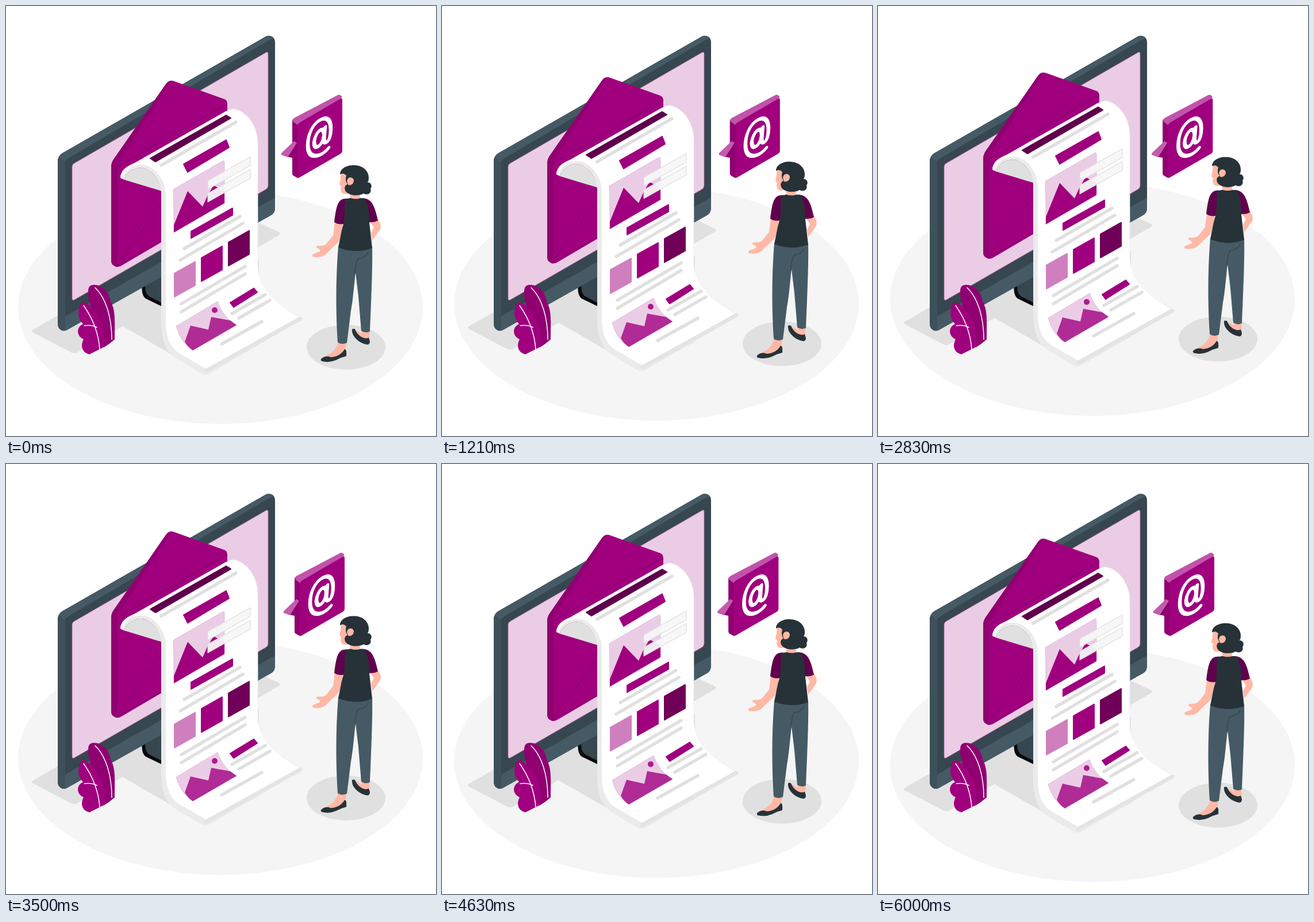
Write an HTML page that moves like this. It is 748x748 px and loops after 6040 ms.

```html
<!DOCTYPE html>
<html lang="en">
<head>
<meta charset="utf-8">
<title>Newsletter</title>
<style>
  html, body { margin: 0; width: 100%; height: 100%; overflow: hidden; background: #fff; }
  svg { display: block; width: 100vw; height: 100vh; }
  .plum { fill: #a0007e; } .plum-side { fill: #900071; } .plum-dark { fill: #60004c; }
  .wine { fill: #700058; } .blush { fill: #ebcce5; } .orchid { fill: #cf7fbe; }
  .slate { fill: #37474f; } .steel { fill: #455a64; } .ink { fill: #263238; }
  .skin { fill: #ffb8a6; } .shade { fill: #e0e0e0; }
  .line { fill: none; stroke-linecap: round; stroke-linejoin: round; }
</style>
</head>
<body>
<svg viewBox="0 0 748 748" xmlns="http://www.w3.org/2000/svg">
  <!-- floor and cast shadows -->
  <g class="float">
    <ellipse cx="373" cy="524" rx="352" ry="203" fill="#f5f5f5"/>
    <g class="shade">
      <path d="M47 563L120 521L400 360L438 376L474 393Q479 396 474 399L125 602Q120 606 114 603L47 568Q43 565 47 563Z"/>
      <path d="M196 553L345 639L440 590L440 440L270 500Z"/>
      <ellipse cx="591.5" cy="593.5" rx="68.5" ry="39"/>
    </g>
  </g>

  <!-- monitor -->
  <g>
    <path fill="#0b0b0d" d="M236 488L262 470L274 490V524L243 509Q238 505 237 498Z"/>
    <path class="slate" d="M242 487L274 468V518L249 505Q244 501 243 496Z"/>
    <path class="slate" d="M90 270Q90 261 98 256L452 53Q458 50 464 54Q468 57 468 64V351Q468 360 461 364L107 563Q100 567 95 563Q90 560 90 552Z"/>
    <path fill="#3e5059" d="M90 270Q90 265 93 262L103 269V564Q98 566 95 563Q90 560 90 552Z"/>
    <path class="steel" d="M92 263Q94 258 98 256L452 53Q458 50 464 54L466 57Q461 57 455 61L110 264Q104 268 102 271Z"/>
    <path class="steel" d="M103 540L468 333V351Q468 360 461 364L107 563L103 565Z"/>
    <path class="blush" stroke="#b46aa6" stroke-width=".8" d="M115 280Q115 276 118 274L452 81Q456 79 456 83V312Q456 317 452 319L119 511Q115 513 115 509Z"/>
  </g>

  <!-- envelope and letter -->
  <g class="float">
    <path class="plum" d="M183 280Q183 273 187 267L278 136Q284 127 293 131L380 162Q385 164 385 171V260L270 411L202 451Q195 456 189 452Q183 450 183 443Z"/>
    <path class="plum-side" d="M183 280Q183 273 187 267L278 136Q282 130 287 130L194 276V454Q183 452 183 443Z"/>
    <path class="line" stroke="#870069" stroke-width="1.4" d="M190 282L384 170M194 288L268 322M196 446L268 347M191 453L270 409"/>
    <path class="shade" d="M205 302C210 287 226 279 240 282C257 288 268 303 271 322Z"/>
    <path fill="#ebebeb" d="M199 299C200 285 210 279 224 273L374 188Q386 180 396 179C419 183 438 208 438 240V456C440 488 462 516 512 541Q516 544 512 547L353 640Q346 643 339 639L294 612C276 600 270 575 270 548V322C268 303 257 288 240 282C226 279 210 287 205 302Z"/>
    <path fill="#fff" d="M199 299C200 285 210 279 224 273L374 188Q386 180 396 179C419 183 438 208 438 240V456C440 488 462 515 510 541L348 631L303 605C285 594 278 575 278 550V326C276 302 262 283 243 277C224 273 208 282 202 300Z"/>
    <path class="line" stroke="#e4e4e4" stroke-width="7" stroke-linecap="butt" d="M348 635L512 544"/>
    <path class="line" stroke="#eee" stroke-width=".8" d="M396 179C419 183 438 208 438 240V456"/>
    <g id="print"></g>
  </g>

  <!-- speech bubble -->
  <g id="bubble">
    <path class="plum" d="M498 198L506 203L582 160L585 162V252Q585 255 582 257L511 298Q508 300 505 298L500 295Q498 294 498 290Z"/>
    <path class="plum-side" d="M498 198L507 205V298.500L500 295Q498 294 498 290Z"/>
    <path fill="#c153aa" d="M498 200Q498 197 501 195L577 155Q580 153 583 156Q585 158 584 160L512 202Q508 204 507 207Z"/>
    <path class="plum-side" d="M488 262L505 238V268L498 264Z"/>
    <path fill="#c45cad" d="M479 259Q478 257 480 255L501 235L506 238L490 263Z"/>
    <path class="line" transform="translate(545 230) skewY(-30) scale(1 .94)" stroke="#fff" stroke-width="6.6"
      d="M16 28C4 37 -20 30 -20 0C-20 -20 -11 -33 1 -33C13 -33 20 -22 20 -5C20 8 17 15 13 15C9 15 8 11 8.500 5L10 -14M8 0C7 9 2 15 -3 14C-8 13 -9 7 -9 1C-8 -8 -3 -14 2 -14C7 -13 9 -7 8 0Z"/>
  </g>

  <!-- woman -->
  <g class="float">
    <path class="skin" d="M618 562H633L632 579Q622 583 610 570Q604 561 613 566L619 570Z"/>
    <path class="ink" d="M602 565Q601 560 607 562Q610 570 617 575Q625 580 631 577L633 583Q633 589 628 589Q618 587 611 581Q602 573 602 565Z"/>
    <path class="skin" d="M578 583L592 586L590 598Q582 611 564 612L556 609Q575 601 578 583Z"/>
    <path class="ink" d="M548 614Q556 607 565 611Q581 610 589 597Q593 596 592 609Q583 611 574 616Q562 621 550 618Q547 617 548 614Z"/>
    <path class="skin" d="M632 374L647 371C651 377 654 384 650 390L637 408L635 395L640 385Z"/>
    <path class="steel" d="M578 418Q608 430 637 419C638 455 635 515 633 566Q626 570 618 565L613 505L608 463C605 490 604 508 600 530L593 586Q584 590 577 585C574 540 573 480 578 418Z"/>
    <path class="line" stroke="#37474f" stroke-width="1.5" d="M630 428Q627 437 613 439Q608 446 607 466"/>
    <path class="skin" d="M572 376L586 377C584 395 582 405 577 412L557 431C552 437 539 438 534 436Q531 433 536 431L546 427Q548 424 541 421Q537 418 544 417Q552 418 557 414L569 399Z"/>
    <path class="plum-dark" d="M594 335C577 334 575 346 571 376Q578 381 588 379L595 345ZM620 334C639 335 642 353 647 373Q641 377 630 376Z"/>
    <path class="skin" d="M598 318L615 320L616 336Q608 339 599 335Z"/>
    <path class="ink" d="M590 336L599 334Q609 337 617 334L624 335Q633 351 632 377L637 421Q608 432 578 420L584 390Q590 372 589 354Z"/>
    <path class="skin" d="M583 291Q582 302 580 310Q580 312 583 313L582 319Q583 327 590 327L604 325V290Z"/>
    <path class="ink" d="M581 293C581 282 594 276 607 277C623 278 632 289 631 300Q631 304 629 307C635 306 638 314 634 318C637 326 628 330 622 326C614 331 596 331 590 321Q587 313 594 310Q589 303 592 295Q587 289 581 293Z"/>
    <path class="skin" d="M593 305C594 296 604 297 605 303C605 310 599 313 595 311Z"/>
  </g>

  <!-- plant -->
  <g>
    <path class="plum-side" d="M143 496Q143 485 153 485C168 485 180 498 182 514C191 530 189 546 189 580Q180 588 170 594L150 530Q142 510 143 496Z"/>
    <path class="plum" d="M130 518Q133 513 139 517Q148 521 150 529Q158 531 159 541Q168 546 168 557Q172 567 171 582V593L145 606Q133 603 132 592Q132 585 135 580Q125 575 125 566Q125 558 134 553Q126 545 126 534Q126 524 130 518Z"/>
    <path class="line" stroke="#fff" stroke-width="1.500" d="M155 490C174 508 184 542 184 580M135 521C152 545 161 570 163 597M136 556Q148 554 158 559"/>
  </g>
</svg>

<script>
const poly = (cls, pts, extra = "") => `<polygon class="${cls}" points="${pts}" ${extra}/>`;

// a flat shape with slightly rounded corners
const slab = (cls, color, pts) =>
  poly(cls, pts, `stroke="${color}" stroke-width="2" stroke-linejoin="round"`);

const rule = (x1, y1, x2, y2) =>
  `<path class="line" stroke="#e0e0e0" stroke-width="5.5" d="M${x1} ${y1}L${x2} ${y2}"/>`;

// upright panel lying in the plane of the page
const panel = (x, y, w, h) => {
  const rise = w * 0.56;
  return `${x},${y} ${x + w},${y - rise} ${x + w},${y - rise + h} ${x},${y + h}`;
};

const plum = "#a0007e", dark = "#60004c", wine = "#700058";
const glass = 'fill="#f7f7f7" fill-opacity=".95" stroke="#dedede" stroke-width="1.2" stroke-linejoin="round"';

document.getElementById("print").innerHTML = [
  slab("plum-dark", dark, "251,265 383,190 391,195 260,271"),
  rule(270, 277, 400, 202),
  slab("plum", plum, "309,275 383,233 388,246 316,289"),

  `<path class="blush" stroke="#d9a3cf" stroke-width=".6" d="M291 319L376 270Q380 268 380 272V343L292 394Q292 350 291 319Z"/>`,
  poly("plum", "292,394 292,381 316,322 342,349 350,331 361,312 380,322 380,343"),
  poly("", panel(351, 304, 74, 15), glass),
  poly("", panel(351, 326, 74, 15), glass),

  slab("plum", plum, panel(322, 392, 72, 12)),
  rule(310, 422, 407, 366),
  rule(303, 442, 412, 378),

  slab("orchid", "#cf7fbe", panel(293, 465, 36, 41)),
  slab("plum", plum, panel(340, 438, 36, 41)),
  slab("wine", wine, panel(387, 411, 36, 41)),
  rule(305, 518, 416, 453),
  rule(305, 532, 416, 466),

  `<path class="blush" stroke="#d9a3cf" stroke-width=".6" d="M296 557L368 514Q377 541 401 555L325 599Q304 586 296 557Z"/>`,
  `<path fill="#b02b95" d="M311 584L321 556L352 563L357 541L390 547L401 555L325 599Q317 594 311 584Z"/>`,
  `<circle fill="#ab1c8e" cx="363" cy="529" r="5"/>`,
  slab("plum", plum, "390,516 431,491 437,498 396,524"),
  rule(393, 535, 451, 502),
  rule(405, 543, 459, 512),
  rule(375, 588, 445, 549)
].join("");

const LOOP = 6040, CYCLE = 6000, FPS = 24, UNIT = 1.496;
const SHAKE = [0, -1, 2, -4, 4, -4, 4, -4, 2, -1, 0];

const floats = document.querySelectorAll(".float");
const bubble = document.getElementById("bubble");
const shift = (el, x, y) => el.setAttribute("transform", `translate(${x.toFixed(3)} ${y.toFixed(3)})`);

function draw(ms) {
  const step = Math.floor((ms % LOOP + 5) * FPS / 1000);
  const p = step * 1000 / FPS / CYCLE % 1;

  const lift = -10 * UNIT * (1 - Math.abs(1 - 2 * p));
  floats.forEach(el => shift(el, 0, lift));

  const i = Math.floor(p * 10), part = p * 10 - i;
  shift(bubble, UNIT * (SHAKE[i] + (SHAKE[i + 1] - SHAKE[i]) * part), 0);
}

const start = performance.now();
function tick() {
  draw(performance.now() - start);
  requestAnimationFrame(tick);
}
tick();
</script>
</body>
</html>
```
